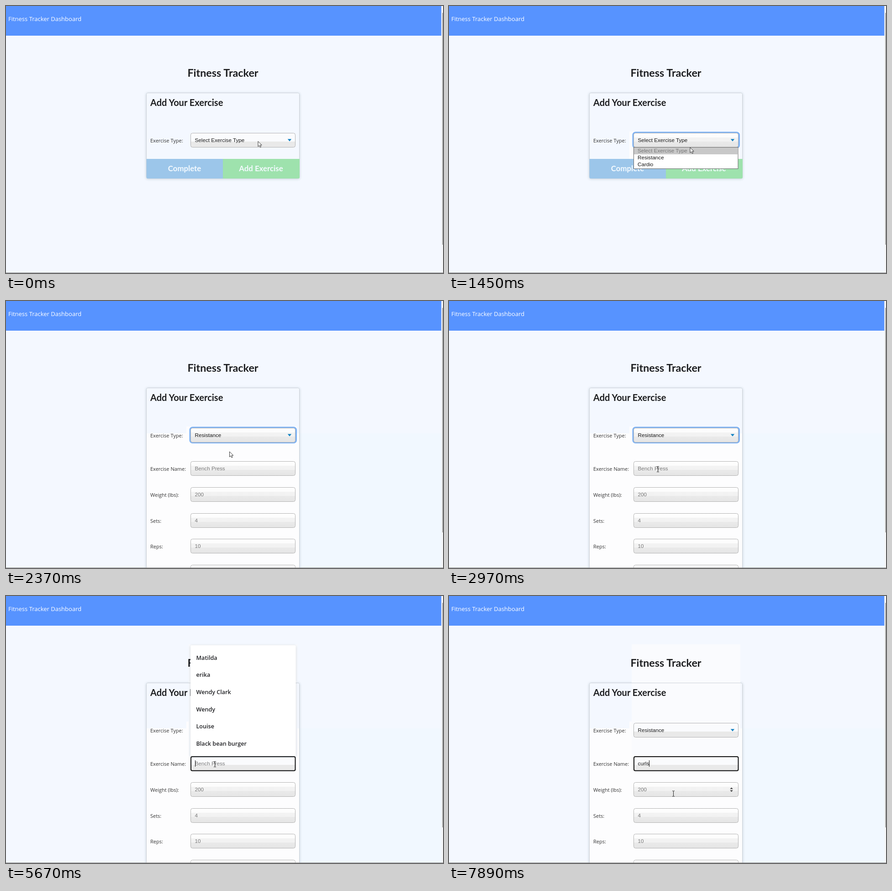
These frames come from a looping animation (957 by 585 pixels, 8000 ms). An HTML page:

```html
<!DOCTYPE html>
<html lang="en">
<head>
<meta charset="utf-8">
<title>Fitness Tracker</title>
<style>
  html, body { margin: 0; width: 100%; height: 100%; overflow: hidden; background: #f4f8ff; }
  svg { display: block; }
  text { font: 11.66px "Liberation Sans", Arial, sans-serif; fill: #151515; white-space: pre; }
  .label { font: 11px "Open Sans", sans-serif; fill: #333; }
  .nav { font: 13px "Open Sans", sans-serif; fill: #fff; }
  .hint { font: 600 12.6px "Open Sans", sans-serif; fill: #202124; }
  .head { font: bold 20px Lato, sans-serif; fill: #1c1d1f; }
  .title { font-size: 23.33px; }
  .btn { font: bold 16.8px Lato, sans-serif; fill: #f4faff; }
  .mid { text-anchor: middle; }
  .gray { fill: #777; }
  .white { fill: #fff; }
  .box { stroke: #b3b3b3; }
</style>
</head>
<body>
<svg width="957" height="585" viewBox="0 0 957 585">
  <defs>
    <linearGradient id="soft" x2="0" y2="1">
      <stop stop-color="#fefefe"/><stop offset=".3" stop-color="#fcfcfc"/>
      <stop offset=".3" stop-color="#f3f3f3"/><stop offset=".6" stop-color="#f2f2f2"/>
      <stop offset=".6" stop-color="#eaeaea"/><stop offset="1" stop-color="#e5e5e5"/>
    </linearGradient>
    <linearGradient id="split" x2="0" y2="1">
      <stop offset=".6" stop-color="#fafbfd"/><stop offset=".6" stop-color="#e9e9e9"/>
    </linearGradient>
    <filter id="shadow" x="-10%" y="-10%" width="120%" height="120%">
      <feDropShadow dx="0" dy="1" stdDeviation="2.5" flood-color="#345" flood-opacity=".25"/>
    </filter>
  </defs>

  <rect width="957" height="585" fill="#f4f8ff"/>
  <rect width="953.5" height="65" fill="#5793ff"/>
  <text class="nav" x="5" y="32.7">Fitness Tracker Dashboard</text>
  <rect data-t="2370 8000" x="643" y="290" width="311" height="294" fill="#f1f8ff"/>

  <!-- card, collapsed and expanded -->
  <g data-t="0 2370">
    <rect x="307.5" y="190.5" width="335" height="187" rx="3" fill="#f4f8ff" stroke="#cdd2d8" filter="url(#shadow)"/>
    <path d="M307.5 335H475V378H310.5a3 3 0 0 1-3-3z" fill="#9cc6ea"/>
    <path d="M475 335H643V375a3 3 0 0 1-3 3H475z" fill="#9ee2ad"/>
    <text class="btn mid" x="391" y="362.3">Complete</text>
    <text class="btn mid" x="558.5" y="362.3">Add Exercise</text>
    <rect data-t="420 2370" x="395" y="275" width="242" height="60" fill="#fdfdfe"/>
  </g>
  <g data-t="2370 8000">
    <rect x="307.5" y="190.5" width="335" height="420" rx="3" fill="#f4f8ff" stroke="#cdd2d8" filter="url(#shadow)"/>
    <path d="M308 290H395V275H637V290H642V585H308z" fill="#fdfdfe"/>
  </g>
  <rect data-t="3570 8000" x="400" y="106" width="238" height="245" fill="#fafbfe"/>
  <path data-t="3570 8000" d="M400 190.5H638" stroke="#cdd2d8"/>
  <text class="head title mid" x="475" y="155">Fitness Tracker</text>
  <text class="head" x="316" y="219">Add Your Exercise</text>

  <!-- type selector -->
  <text class="label" x="316" y="299">Exercise Type:</text>
  <rect data-t="420 3570" x="403.5" y="277.5" width="231.5" height="32.5" rx="5" fill="none" stroke="#7db2f5" stroke-width="4"/>
  <rect data-t="130 3570" class="box" x="404.5" y="278.5" width="229" height="31" rx="4" fill="url(#soft)"/>
  <rect data-t="0 130 3570 8000" class="box" x="404.5" y="278.5" width="229" height="31" rx="4" fill="url(#split)"/>
  <path d="M616.8 291.5h8.4l-4.2 5z" fill="#0a7fc0"/>
  <text data-t="0 2370" x="413.6" y="297.8">Select Exercise Type</text>
  <text data-t="2370 8000" x="413.6" y="297.8">Resistance</text>

  <g data-t="420 2370">
    <rect x="404.5" y="309.5" width="228.5" height="47" fill="#fff" stroke="#666"/>
    <rect data-t="420 1750" x="405" y="310" width="227.5" height="15" fill="#c8c8c8"/>
    <rect data-t="1750 2370" x="405" y="325" width="227.5" height="15" fill="#1e90ff"/>
    <text class="gray" x="413" y="320.8">Select Exercise Type</text>
    <text data-t="420 1750" x="413" y="335.6">Resistance</text>
    <text data-t="1750 2370" class="white" x="413" y="335.6">Resistance</text>
    <text x="413" y="350.8">Cardio</text>
  </g>

  <g id="fields" data-t="2370 8000"></g>
  <g data-t="3570 8000">
    <rect x="405" y="352" width="228.5" height="30.7" rx="3" fill="url(#split)" stroke="#111" stroke-width="2"/>
    <text data-t="3570 5820" class="gray" x="413.6" y="371">Bench Press</text>
    <text id="typed" x="413.6" y="371"></text>
    <path id="caret" d="M.5 360V374" stroke="#111"/>
  </g>
  <path data-t="7890 8000" d="M615.3 423h6.6l-3.3-3.6zM615.3 425.6h6.6l-3.3 3.6z" fill="#444"/>

  <g id="hints" data-t="3570 5820">
    <rect x="404" y="108" width="230.5" height="243" rx="3" fill="#fff" filter="url(#shadow)"/>
  </g>

  <path id="arrow" d="M0 0V11.6L2.7 9.1 4.6 13.2 6.5 12.3 4.7 8.3H8.2z" fill="#fff" stroke="#222" stroke-width=".9"/>
  <path id="beam" d="M-2.5-6H-.7L0-5.4.7-6H2.5M0-5.5V5.5M-2.5 6H-.7L0 5.4.7 6H2.5" fill="none" stroke="#222"/>

  <!-- window edges -->
  <rect x="953.5" width="3.5" height="585" fill="#f5f6f8"/>
  <rect data-t="0 2370" x="955.5" y="15" width="1.5" height="508" fill="#999"/>
  <rect data-t="2370 8000" x="955.5" y="15" width="1.5" height="492" fill="#999"/>
  <rect y="584" width="957" height="1" fill="#8c8c8c"/>
</svg>
<script>
const LOOP = 8000;
const $ = id => document.getElementById(id);
const add = (id, markup) => $(id).insertAdjacentHTML("beforeend", markup);

const fields = [["Exercise Name:", "Bench Press"], ["Weight (lbs):", "200"], ["Sets:", "4"], ["Reps:", "10"], ["", ""]];
fields.forEach(([label, value], i) => {
  const y = Math.round(351 + i * 56.8) + .5;
  add("fields", `<text class="label" x="316" y="${y + 20.6}">${label}</text>
    <rect class="box" x="404.5" y="${y}" width="229" height="31" rx="4" fill="url(#soft)"/>
    <text class="gray" x="413.6" y="${y + 19.5}">${value}</text>`);
});
["Matilda", "erika", "Wendy Clark", "Wendy", "Louise", "Black bean burger"].forEach((hint, i) =>
  add("hints", `<text class="hint" x="416.5" y="${139.8 + i * 37.65}">${hint}</text>`));

const timed = [...document.querySelectorAll("[data-t]")].map(el => [el, el.dataset.t.split(" ").map(Number)]);
const show = (el, on) => el.style.display = on ? "" : "none";

// time, x, y, shape
const pointer = [
  [0, 552, 296.5, "arrow"], [1300, 545, 301, "arrow"], [1450, 528, 310, "arrow"],
  [1600, 509, 319, "arrow"], [1750, 495, 327, "arrow"], [1900, 489.5, 330, "arrow"],
  [2670, 482, 336, "arrow"], [2820, 466, 361, "beam"], [2970, 457.5, 368.5, "beam"],
  [5820, 0, 0, ""], [7310, 475, 361, "beam"], [7455, 522, 337, "arrow"],
  [7600, 518, 366, "beam"], [7745, 503, 393, "arrow"], [7890, 491.5, 433, "beam"]
];
const keys = [5820, 5970, 6270, 6410, 6550];
const caretFlips = [4170, 4600, 5200, 5670, 7010, 7455];

function render(t) {
  for (const [el, times] of timed)
    show(el, times.some((from, i) => i % 2 === 0 && t >= from && t < times[i + 1]));

  const [, x, y, shape] = pointer.findLast(p => t >= p[0]);
  for (const id of ["arrow", "beam"]) show($(id), id === shape);
  if (shape) $(shape).setAttribute("transform", `translate(${x} ${y})`);

  const typed = "curls".slice(0, keys.filter(k => t >= k).length);
  $("typed").textContent = typed;
  const end = typed && t >= 3570 ? $("typed").getComputedTextLength() : 0;
  $("caret").setAttribute("transform", `translate(${Math.round(413.6 + end - .3 * !!typed)} 0)`);
  show($("caret"), caretFlips.filter(f => t >= f).length % 2 === 0);
}

const start = performance.now();
function tick() {
  render((performance.now() - start) % LOOP);
  requestAnimationFrame(tick);
}
tick();
</script>
</body>
</html>
```
